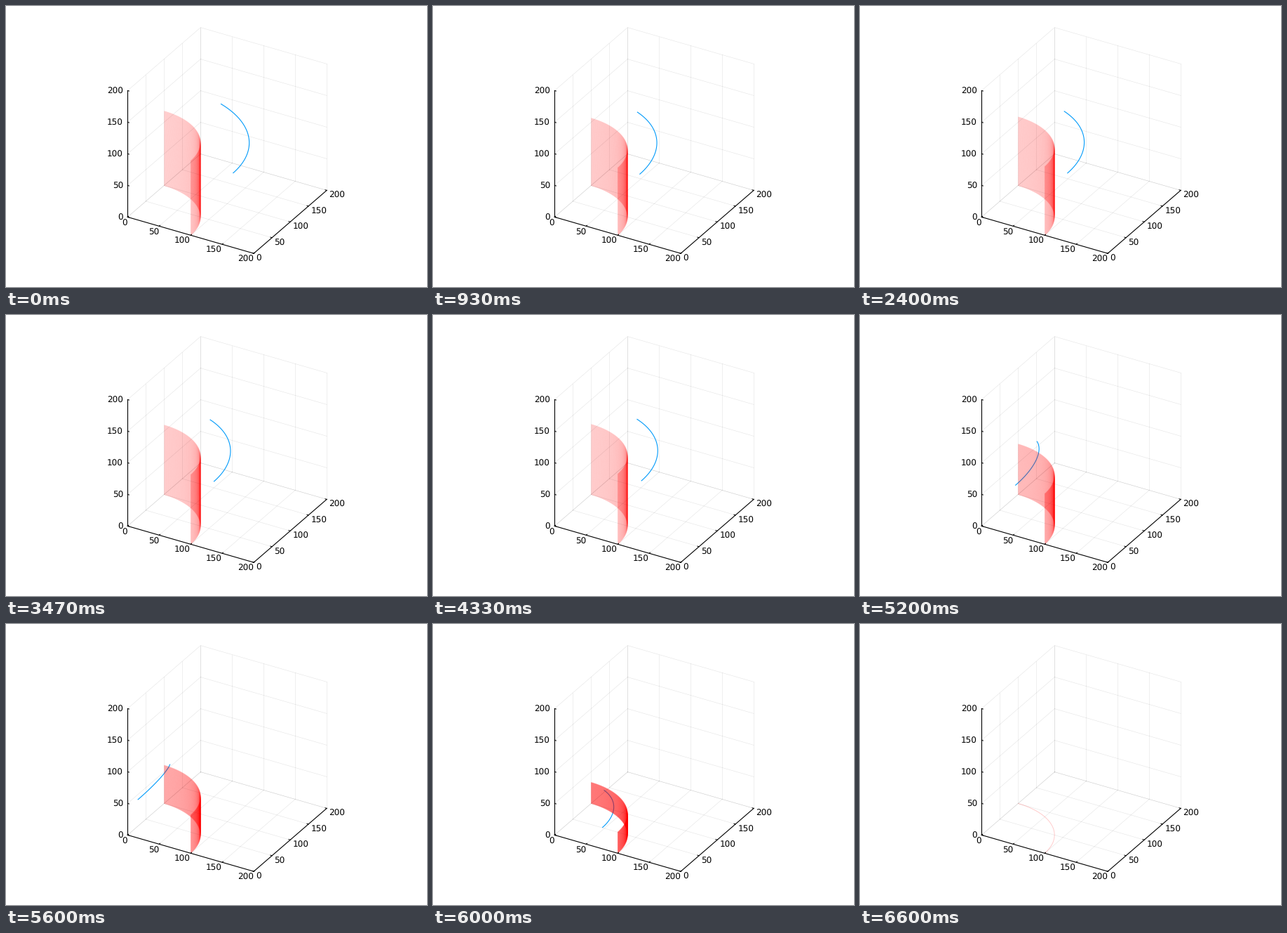
A matplotlib script that plays this animation: 600x400 px, repeating every 8.07 s.

```python
import numpy as np
import matplotlib.pyplot as plt
from matplotlib.animation import FuncAnimation
from matplotlib.collections import LineCollection

W, H, DPI = 600, 400, 100
PX = 72 / DPI
FRAMES, TICK_MS = 269, 30
STEPS_PER_SECOND = 15
TICKS = range(0, 201, 50)
BLUE, RED = "#009afa", "#ff0000"
LAYERS = 100
DROP, PAUSE, RESUME, END = 3.85, 3.15, 69.8, 99

plt.rcParams["font.family"] = "DejaVu Sans"
plt.rcParams["text.hinting"] = "no_hinting"
plt.rcParams["path.simplify"] = False
fig = plt.figure(figsize=(W / DPI, H / DPI), dpi=DPI, facecolor="white")
ax = fig.add_axes([0, 0, 1, 1])
ax.set(xlim=(0, W), ylim=(H, 0))
ax.axis("off")


def project(x, y, z):
    """Orthographic view: data coordinates to stage pixels."""
    return 173.3 + 0.899 * x + 0.52 * y, 300.4 + 0.259 * x - 0.449 * y - 0.9 * z


def segment(a, b, width, zorder, **style):
    (x0, y0), (x1, y1) = project(*a), project(*b)
    ax.plot([x0, x1], [y0, y1], lw=width * PX, zorder=zorder, **style)


def label(text, x, y, align):
    ax.text(x, y + 4.4, text, ha=align, va="baseline", fontsize=12 * PX, zorder=6)


def draw_axes():
    grid = dict(color="black", alpha=0.1)
    ink = dict(color="black")
    for t in TICKS:
        for a, b in (
            ((t, 0, 0), (t, 200, 0)), ((t, 200, 0), (t, 200, 200)),
            ((0, t, 0), (200, t, 0)), ((0, t, 0), (0, t, 200)),
            ((0, 0, t), (0, 200, t)), ((0, 200, t), (200, 200, t)),
        ):
            segment(a, b, 0.6, 1, **grid)

        segment((t, 0, 0), (t, 2.4, 0), 1, 5, **ink)
        segment((200, t, 0), (197.6, t, 0), 1, 5, **ink)
        segment((0, 0, t), (2.4, 0, t), 1, 5, **ink)

        x, y = project(t, 0, 0)
        label(str(t), x - 0.2, y + 7.6, "right")
        x, y = project(200, t, 0)
        label(str(t), x + 3.3, y + 6.2, "left")
        x, y = project(0, 0, t)
        label(str(t), x - 6.2, y + 0.2, "right")

    segment((0, 0, 0), (200, 0, 0), 1.1, 5, **ink)
    segment((200, 0, 0), (200, 200, 0), 1.1, 5, **ink)
    segment((0, 0, 0), (0, 0, 200), 1.1, 5, **ink)


def state(k):
    """Semi-axes of the blue arc and the common height at step k."""
    if k < PAUSE:
        return 167 - 10.4 * k, 166.6 - 3.15 * k, 117.4 - DROP * k
    if k < RESUME:
        return 134 + 0.051 * k, 156.6 - 0.049 * k, 105.1 + 0.0875 * k
    u = k - RESUME
    a = np.hypot(16, 10.4 * (u - 13.1))
    b = 153.2 - 3.13 * u + 0.0256 * u * (u - 8.2)
    return a, b, 111.2 - DROP * u


draw_axes()
quarter = np.linspace(0, np.pi / 2, 48)
sweep = np.linspace(0, np.radians(70), 60)
wall_x, wall_y = 100 * np.cos(quarter), 100 * np.sin(quarter)

arc, = ax.plot([], [], color=BLUE, lw=1.1 * PX, solid_capstyle="butt", zorder=3)
wall = LineCollection([], colors=RED, alpha=0.2, linewidths=PX,
                      capstyle="butt", zorder=4)
ax.add_collection(wall, autolim=False)


def update(frame):
    # The motion advances in whole steps, sampled at the middle of each tick.
    k = int((frame + 0.5) * TICK_MS * STEPS_PER_SECOND / 1000)
    if k < END:
        a, b, height = state(k)
        arc.set_data(*project(a * np.cos(sweep), b * np.sin(sweep), height))
        levels = np.linspace(0, height, LAYERS)
    else:
        arc.set_data([], [])
        levels = [0]
    wall.set_segments([np.column_stack(project(wall_x, wall_y, z)) for z in levels])
    return arc, wall


anim = FuncAnimation(fig, update, frames=FRAMES, interval=TICK_MS,
                     init_func=lambda: update(0), repeat=True, repeat_delay=0)
plt.show()
```
